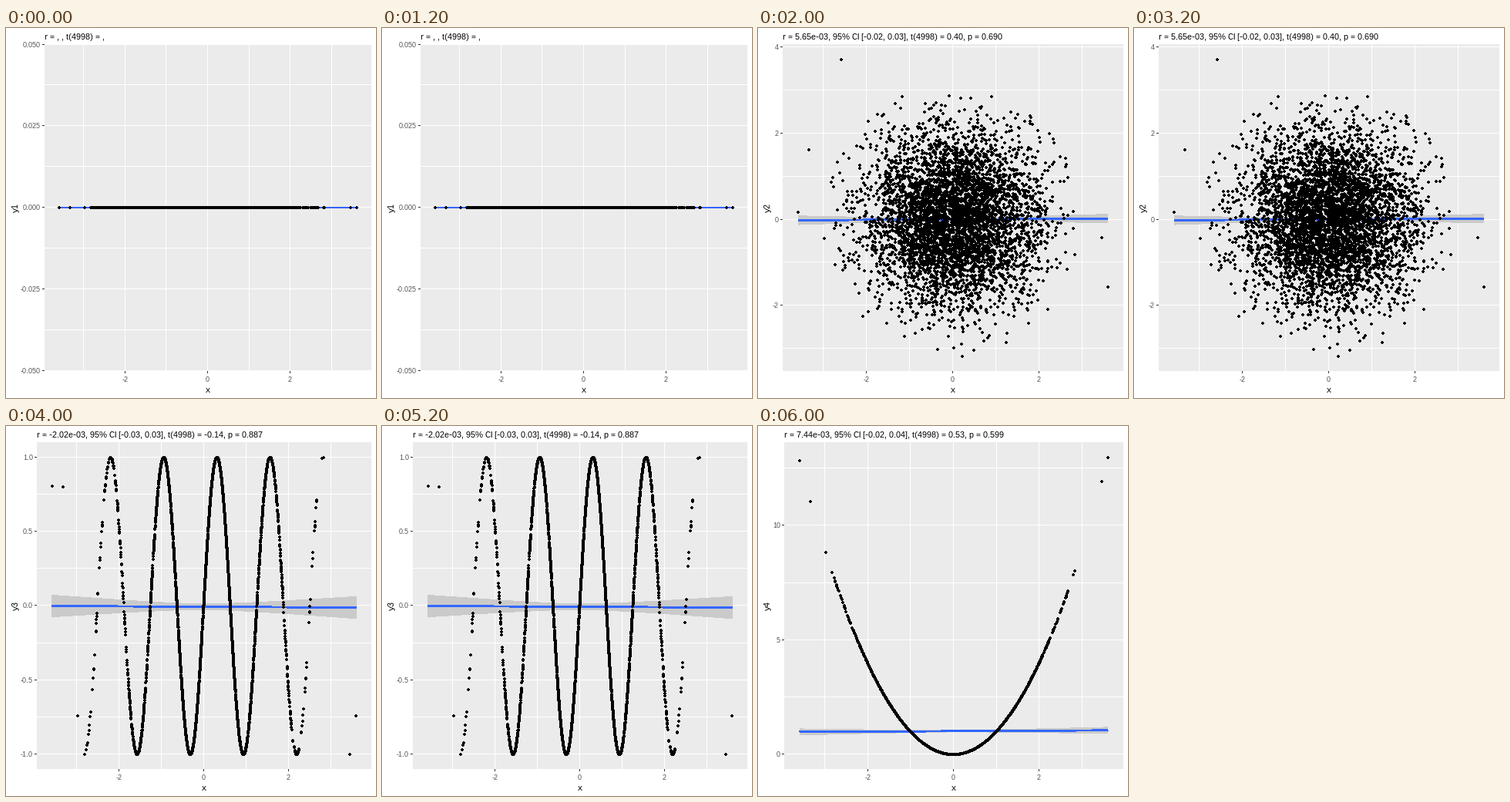
A matplotlib script for the animation above (8000 ms loop, 480x480 px).

```python
import math

import matplotlib.pyplot as plt
import numpy as np
from matplotlib.animation import FuncAnimation
from matplotlib.patches import Polygon, Rectangle

SIZE, DPI = 480, 72
TOP, BOTTOM, RIGHT = 21, 445, 474
N = 5000

plt.rcParams.update({
    "font.family": "Liberation Sans",
    "text.hinting": "default",
    "text.hinting_factor": 1,
})

# A round normal cloud, plus the outliers that set the axis ranges
OUTLIERS = [(-3.583, .17), (-3.328, 1.62), (3.604, -1.57), (3.456, -.42),
            (-2.58, 3.72), (.22, -3.18)]
rng = np.random.default_rng(4)
cloud = rng.standard_normal((N + 300, 2))
cloud = cloud[np.hypot(*cloud.T) < 3.15][:N - len(OUTLIERS)]
x, noise = np.vstack([OUTLIERS, cloud]).T

PLOTS = [
    dict(y=0 * x, left=50, step=.025, digits=3, r=None, mean=0),
    dict(y=noise, left=32, step=2, digits=0, r=.00565, mean=.004),
    dict(y=np.sin(5 * x), left=40, step=.5, digits=1, r=-.002016, mean=-.0055),
    dict(y=x ** 2, left=34, step=5, digits=0, r=.00744, mean=1.02),
]

# Four-pixel disc without its corners
DOT = [(-1, -2), (1, -2), (1, -1), (2, -1), (2, 1), (1, 1),
       (1, 2), (-1, 2), (-1, 1), (-2, 1), (-2, -1), (-1, -1)]

fig = plt.figure(figsize=(SIZE / DPI, SIZE / DPI), dpi=DPI, facecolor="white")
ax = fig.add_axes([0, 0, 1, 1])


def limits(values):
    low, high = values.min(), values.max()
    pad = .05 * (high - low) or .05
    return low - pad, high + pad


def scale(domain, start, end):
    low, high = domain
    return lambda v: start + (np.asarray(v) - low) / (high - low) * (end - start)


def multiples(step, domain):
    first, last = (v / step for v in domain)
    return [k * step for k in range(math.ceil(first), math.floor(last) + 1)]


def summary(r):
    df = N - 2
    if r is None:
        return f"r = , , t({df}) = , "
    t = r * math.sqrt(df / (1 - r * r))
    p = math.erfc(abs(t) / math.sqrt(2))
    margin = 1.96 / math.sqrt(N - 3)
    return (f"r = {r:.2e}, 95% CI [{r - margin:.2f}, {r + margin:.2f}], "
            f"t({df}) = {t:.2f}, p = {p:.3f}")


def box(x0, y0, w, h, color):
    ax.add_patch(Rectangle((x0, y0), w, h, fc=color, lw=0, aa=False))


def label(px, py, text, size=11, color="black", **kw):
    ax.text(px, py, text, size=size, color=color, va="baseline", **kw)


def draw_fit(to_x, to_y, mean, r, sd):
    """Regression line with its 95% band."""
    gx = np.linspace(x.min(), x.max(), 80)
    gy = mean + (r or 0) * sd * gx
    half = 1.96 * sd * np.sqrt((1 + gx ** 2) / N)
    if sd:
        band = np.column_stack([np.r_[to_x(gx), to_x(gx[::-1])],
                                np.r_[to_y(gy + half), to_y((gy - half)[::-1])]])
        ax.add_patch(Polygon(band, fc="#CACACA", lw=0, aa=False))
    ax.plot(to_x(gx), to_y(gy), color="#3366FF", lw=1.9, aa=False,
            solid_capstyle="butt")


def draw(i):
    plot = PLOTS[i]
    y, left, step = plot["y"], plot["left"], plot["step"]
    x_lim, y_lim = limits(x), limits(y)
    to_x = scale(x_lim, left, RIGHT)
    to_y = scale(y_lim, BOTTOM + .4, TOP + .5)

    def row(v):
        return round(float(to_y(v))) - 1

    ax.clear()
    ax.set(xlim=(0, SIZE), ylim=(SIZE, 0))
    ax.axis("off")

    box(left, TOP, RIGHT - left, BOTTOM - TOP, "#EBEBEB")
    for v in multiples(1, x_lim):
        box(int(to_x(v)), TOP, 1, BOTTOM - TOP, "white")
    for v in multiples(step / 2, y_lim):
        box(left, row(v), RIGHT - left, 1, "white")

    draw_fit(to_x, to_y, plot["mean"], plot["r"], y.std())
    ax.plot(to_x(x), to_y(y), ls="", marker=DOT, ms=4, mew=0,
            color="black", aa=False)

    for v in multiples(2, x_lim):
        px = int(to_x(v))
        box(px, BOTTOM, 1, 3, "#333333")
        label(px + .5, 459, str(v), 9, "#4D4D4D", ha="center")
    for v in multiples(step, y_lim):
        box(left - 3, row(v), 3, 1, "#333333")
        label(left - 5, row(v) + 4, f"{v:.{plot['digits']}f}", 9, "#4D4D4D",
              ha="right")

    label(left, 15, summary(plot["r"]))
    label((left + RIGHT) / 2, 473, "x", ha="center")
    label(16, 233, f"y{i + 1}", ha="center", rotation=90, rotation_mode="anchor")
    return []


anim = FuncAnimation(fig, draw, frames=len(PLOTS), interval=2000,
                     init_func=lambda: [], repeat=True, repeat_delay=0)
plt.show()
```
